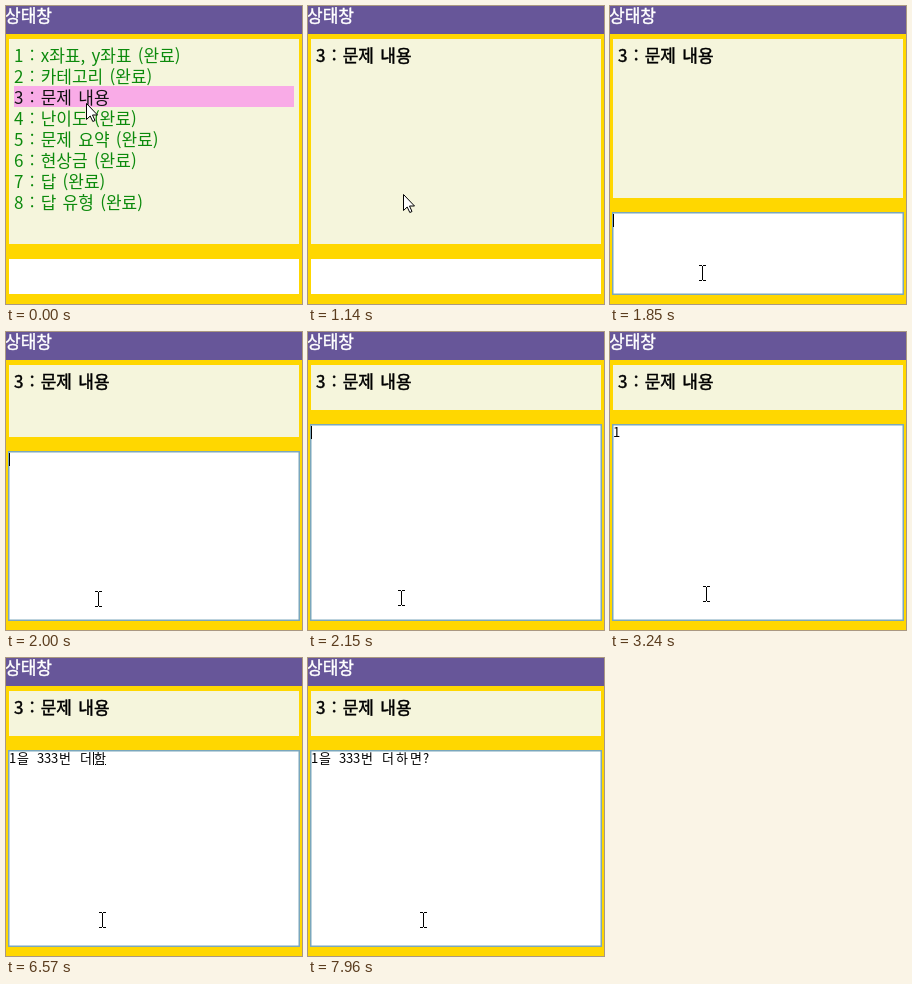
Animation of 296 by 298 pixels, one loop 8 s. Source, as an HTML page:

```html
<!DOCTYPE html>
<html lang="ko">
<head>
<meta charset="utf-8">
<style>
html, body { margin: 0; width: 100%; height: 100%; overflow: hidden; background: #ffd700; }
svg { display: block; }
text { font-family: "Noto Sans CJK KR", "Noto Sans CJK", "Noto Sans", sans-serif; font-size: 17px; word-spacing: 1.5px; white-space: pre; }
.medium { stroke-width: .45px; }
#typed text { font-size: 13px; }
</style>
</head>
<body>
<svg width="296" height="298" viewBox="0 0 296 298">
  <rect width="296" height="298" fill="#ffd700"/>
  <rect width="296" height="28" fill="#675699"/>
  <text class="medium" x="-1" y="16" fill="#fff" stroke="#fff">상태창</text>
  <rect id="panel" x="3" y="33" width="290" height="205" fill="#f5f5dc"/>
  <g id="list" fill="#0c8a0c">
    <rect x="8" y="80" width="280" height="21" fill="#f9abe7"/>
  </g>
  <text id="title" class="medium" x="8" y="56" fill="#000" stroke="#000">3 : 문제 내용</text>
  <rect id="box" x="3" width="290" fill="#fff"/>
  <rect id="focus" x="2.75" width="290.5" fill="none" stroke="#7ba7bc" stroke-width="1.5"/>
  <g id="typed"></g>
  <path id="underline" stroke="#000" stroke-dasharray="1 1"/>
  <rect id="caret" width="1" height="13"/>
  <path id="arrow" d="M.5 .5V16.5L4.2 13L6.8 18.5L9 17.5L6.5 12H11.5Z" fill="#fff" stroke="#000"/>
  <path id="beam" d="M-3 -7.5H0M1 -7.5H4M.5 -7V7M-3 7.5H0M1 7.5H4" fill="none" stroke="#000"/>
</svg>
<script>
const LOOP = 8000, OPEN_AT = 530, FOCUS_AT = 1704, GROW = 406, BLINK = 530;
const LEFT = 3;
const PHRASE = '1을 333번 더하면?';
const ROWS = ['x좌표, y좌표', '카테고리', '문제 내용', '난이도', '문제 요약', '현상금', '답', '답 유형'];

// time, committed characters, syllable being composed, caret-on span
const KEYS = [
  [FOCUS_AT, 0], [2700, 1],
  [3390, 1, 'ㅇ'], [3470, 1, '으'], [3620, 1, '을'], [3860, 3],
  [4550, 4], [4780, 5], [4950, 6, '', 460],
  [5480, 6, 'ㅂ'], [5560, 6, '버'], [5720, 6, '번'], [5870, 8],
  [6110, 8, 'ㄷ'], [6190, 8, '더'], [6420, 8, '덯'],
  [6500, 9, '하'], [6570, 9, '함'], [6720, 10, '며'], [6800, 10, '면'], [7430, 12]
];

// pointer hot spot: time, x, y
const PATH = [
  [0, 80, 97], [299, 80, 97], [300, 83, 95], [960, 83, 95], [1140, 95, 188],
  [1300, 94, 240], [1450, 92, 267], [2100, 92, 267], [2320, 96, 262],
  [7959, 96, 262], [7960, 115, 262], [LOOP, 115, 262]
];

const $ = id => document.getElementById(id);
const set = (el, attrs) => { for (const k in attrs) el.setAttribute(k, attrs[k]); };
const show = (el, on) => { el.style.display = on ? '' : 'none'; };
const wide = ch => ch > '\u3000';
const cell = ch => wide(ch) ? 14 : 7;
const widthOf = s => [...s].reduce((w, ch) => w + cell(ch), 0);

function addText(parent, x, y, str, fill) {
  const el = document.createElementNS('http://www.w3.org/2000/svg', 'text');
  set(el, { x, y });
  if (fill) set(el, { fill });
  el.textContent = str;
  parent.appendChild(el);
}

ROWS.forEach((name, i) => {
  const open = i === 2;
  addText($('list'), 8, 56 + 21 * i, `${i + 1} : ${name}${open ? '' : ' (완료)'}`, open && '#111');
});

function pointerAt(t) {
  const i = Math.max(1, PATH.findIndex(p => p[0] > t));
  const [t0, x0, y0] = PATH[i - 1], [t1, x1, y1] = PATH[i];
  const p = (t - t0) / (t1 - t0);
  return [Math.round(x0 + (x1 - x0) * p), Math.round(y0 + (y1 - y0) * p)];
}

let shown = '';
function drawTyped(str) {
  if (str === shown) return;
  shown = str;
  $('typed').textContent = '';
  let x = LEFT;
  for (const ch of str) {
    if (ch !== ' ') addText($('typed'), x + (wide(ch) ? 1 : 0), 105, ch);
    x += cell(ch);
  }
}

function draw(t) {
  show($('list'), t < OPEN_AT);
  show($('title'), t >= OPEN_AT);

  const p = Math.min(1, Math.max(0, (t - FOCUS_AT) / GROW));
  const top = Math.round(253 - 160 * (0.5 - Math.cos(Math.PI * p) / 2));
  set($('panel'), { height: top - 48 });
  set($('box'), { y: top, height: 288 - top });
  set($('focus'), { y: top - 0.25, height: 288.5 - top });
  show($('focus'), t >= FOCUS_AT);

  const key = KEYS.filter(k => k[0] <= t).pop();
  const [at, count, comp = '', span = BLINK] = key || [0, 0];
  const done = PHRASE.slice(0, count);
  const x = LEFT + widthOf(done);
  drawTyped(done + comp);
  set($('caret'), { x, y: top + 1 });
  show($('caret'), key && Math.floor((t - at) / span) % 2 === 0);
  set($('underline'), { d: `M${x} 106.5h13` });
  show($('underline'), comp);

  const [px, py] = pointerAt(t);
  const inBox = py >= top;
  for (const id of ['arrow', 'beam']) set($(id), { transform: `translate(${px} ${py})` });
  show($('arrow'), !inBox);
  show($('beam'), inBox);
}

const start = performance.now();
function tick() {
  draw((performance.now() - start) % LOOP);
  requestAnimationFrame(tick);
}
tick();
</script>
</body>
</html>
```
